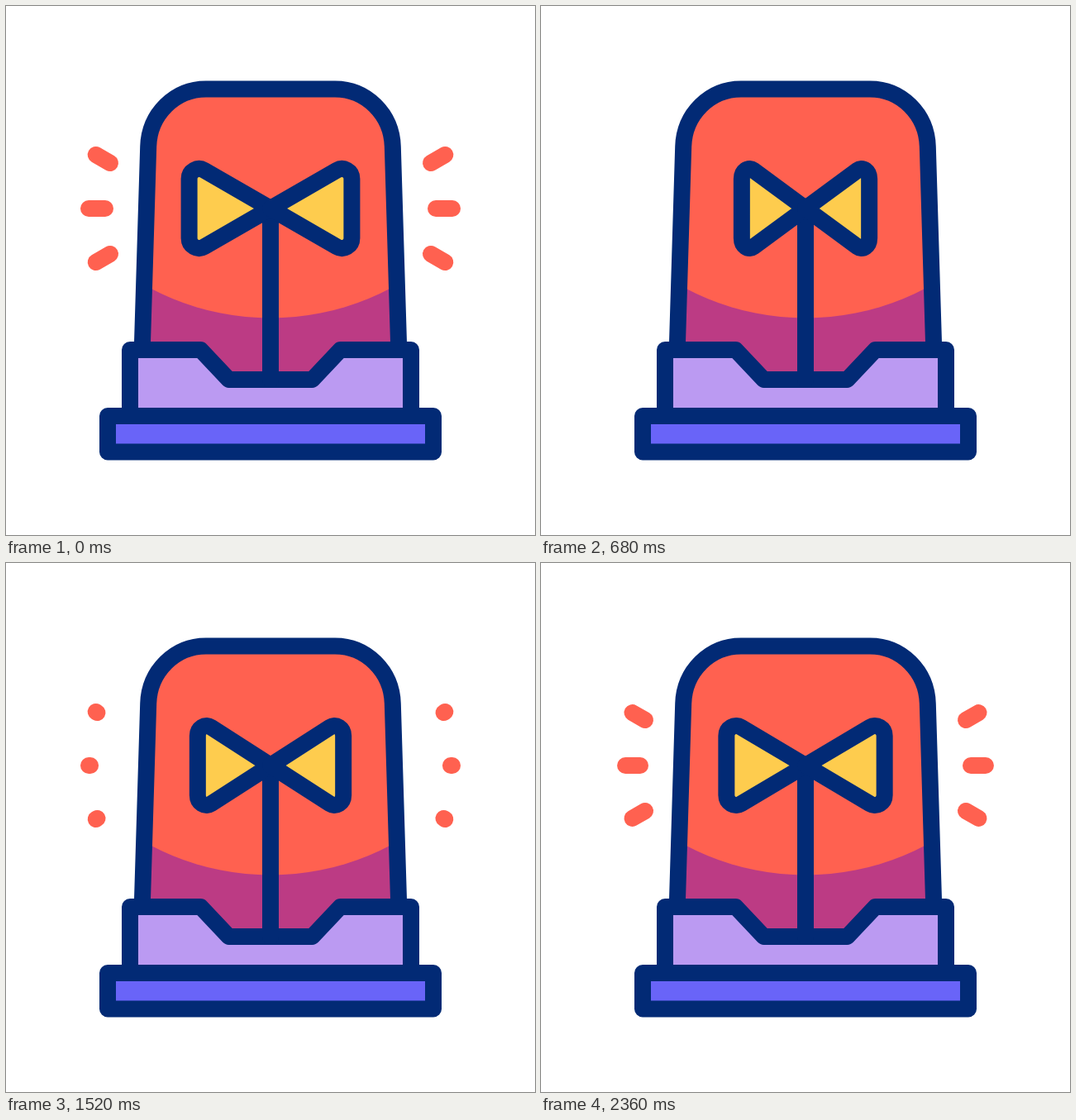
An HTML page with a canvas that plays this animation: 640x640 px, repeating every 2400 ms.

```html
<!DOCTYPE html>
<html lang="en">
<head>
<meta charset="utf-8">
<title>Siren</title>
<style>
html, body { margin: 0; width: 100%; height: 100%; overflow: hidden; background: #fff; }
canvas { display: block; width: 100vmin; height: 100vmin; }
</style>
</head>
<body>
<canvas id="stage" width="640" height="640"></canvas>
<script>
const ctx = document.getElementById('stage').getContext('2d');
const NAVY = '#022a75', RED = '#ff6150', PLUM = '#bc3b84';
const LILAC = '#bb9af2', BLUE = '#6964f8', YELLOW = '#fecc4e';
const LOOP = 2400, STEP = 40, SPIN = 800, EASE = 400;
const CX = 320, BOW_Y = 245;

const clamp = u => Math.min(1, Math.max(0, u));
const smooth = u => u * u * (3 - 2 * u);
const ramp = (t, start) => smooth(clamp((t - start) / EASE));

function polygon(points) {
  const path = new Path2D();
  points.forEach(([x, y]) => path.lineTo(x, y));
  path.closePath();
  return path;
}

function line(x1, y1, x2, y2, color) {
  ctx.strokeStyle = color;
  ctx.beginPath();
  ctx.moveTo(x1, y1);
  ctx.lineTo(x2, y2);
  ctx.stroke();
}

function outlined(path, fill) {
  ctx.fillStyle = fill;
  ctx.strokeStyle = NAVY;
  ctx.fill(path);
  ctx.stroke(path);
}

const dome = new Path2D(
  'M164 440L172.2 170C173.4 131 204 100.5 242 100.5H398C436 100.5 466.6 131 467.8 170L476 440V452H164Z');
const base = polygon([[150, 416], [235.5, 416], [269.5, 452], [370.5, 452],
  [404.5, 416], [490, 416], [490, 496], [150, 496]]);
const foot = polygon([[123, 496], [517, 496], [517, 539.5], [123, 539.5]]);

function drawDome() {
  ctx.fillStyle = PLUM;
  ctx.fill(dome);
  ctx.save();
  ctx.clip(dome);
  ctx.fillStyle = RED;
  ctx.beginPath();
  ctx.arc(CX, 67.5, 310, 0, Math.PI * 2);
  ctx.fill();
  ctx.restore();
  ctx.save();
  ctx.beginPath();
  ctx.rect(0, 0, 640, 425);
  ctx.clip();
  ctx.strokeStyle = NAVY;
  ctx.stroke(dome);
  ctx.restore();
}

// The outline is squeezed sideways, but its stroke keeps a constant width.
function drawReflector(side, squeeze) {
  const w = 98.4, h = w * Math.tan(Math.PI / 6);
  ctx.save();
  ctx.translate(CX, BOW_Y);
  ctx.scale(side * Math.max(squeeze, 0.001), 1);
  ctx.beginPath();
  ctx.moveTo(0, 0);
  ctx.arcTo(w, -h, w, 0, 12);
  ctx.arcTo(w, h, 0, 0, 12);
  ctx.closePath();
  ctx.restore();
  ctx.fillStyle = YELLOW;
  ctx.strokeStyle = NAVY;
  ctx.fill();
  ctx.stroke();
}

// Visible part of each ray, from 0 (inner end) to 1 (outer end).
function rayRange(t) {
  if (t < 800) return [ramp(t, 0), 1];
  if (t < 1200) return [0, ramp(t, 800)];
  if (t < 2040) return [ramp(t, 1200), 1];
  return [0, ramp(t, 2040)];
}

function drawRays(t) {
  const [from, to] = rayRange(t);
  if (to - from < 1e-4) return;
  const rays = [[194, -55, 211.3, -65], [200, 0, 220, 0], [194, 55, 211.3, 65]];
  for (const side of [-1, 1]) {
    for (const [x1, y1, x2, y2] of rays) {
      const at = k => [CX + side * (x1 + (x2 - x1) * k), BOW_Y + y1 + (y2 - y1) * k];
      line(...at(from), ...at(to), RED);
    }
  }
}

function draw(t) {
  ctx.fillStyle = '#fff';
  ctx.fillRect(0, 0, 640, 640);
  ctx.lineWidth = 20;
  ctx.lineJoin = ctx.lineCap = 'round';

  drawDome();
  outlined(base, LILAC);
  outlined(foot, BLUE);
  line(CX, 255, CX, 452, NAVY);

  const phase = t % SPIN;
  const squeeze = 1 - smooth(Math.min(phase, SPIN - phase) / EASE);
  drawReflector(-1, squeeze);
  drawReflector(1, squeeze);
  drawRays(t);
}

let start;
function tick(now) {
  start ??= now;
  const t = Math.max(0, now - start) % LOOP;
  draw(Math.floor(t / STEP) * STEP);
  requestAnimationFrame(tick);
}
draw(0);
requestAnimationFrame(tick);
</script>
</body>
</html>
```
